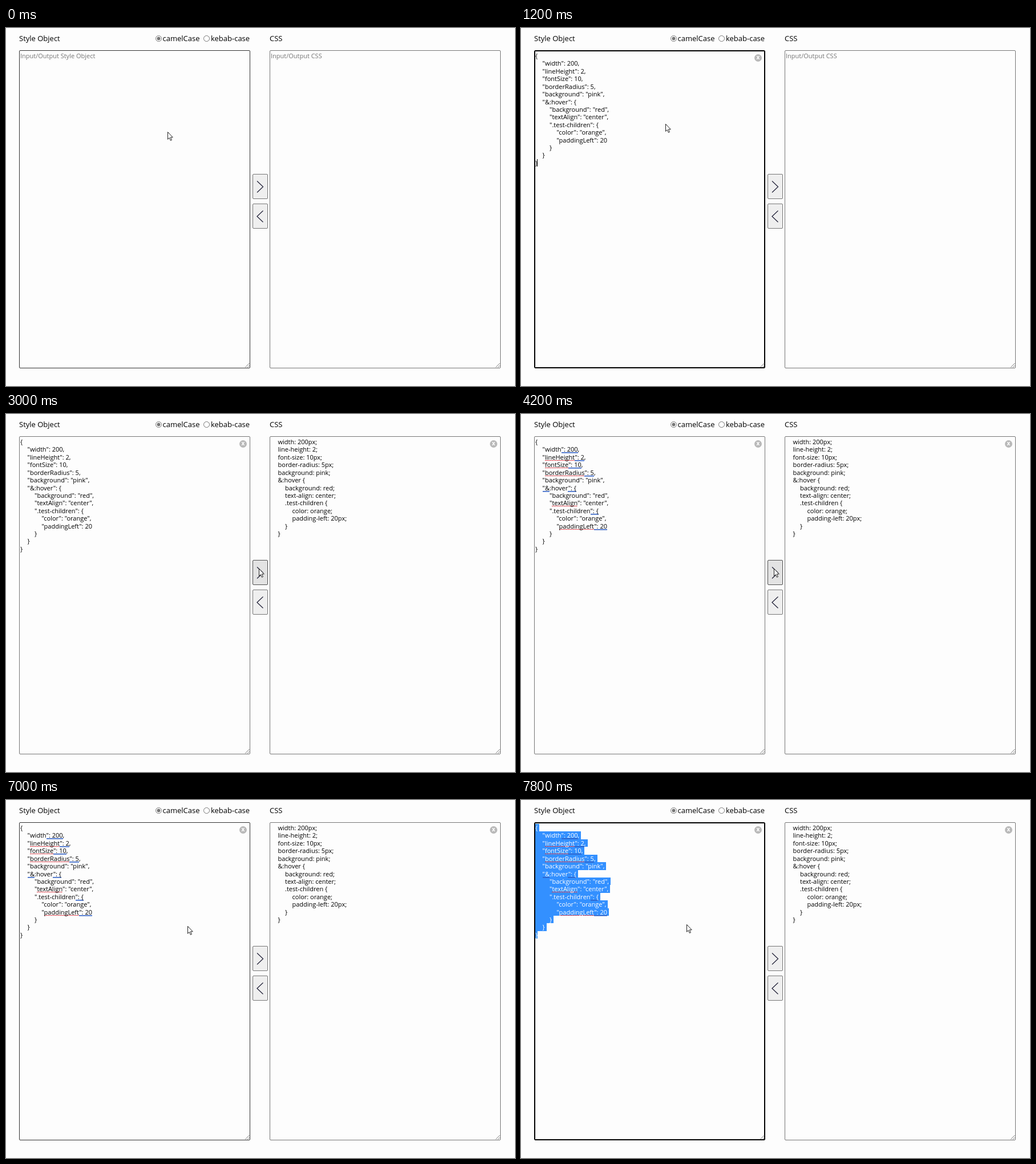
Write an HTML page that moves like this. It is 892 by 628 pixels and loops after 8 s.

```html
<!DOCTYPE html>
<html lang="en">
<head>
<meta charset="utf-8">
<title>Style Object and CSS converter</title>
<style>
  html, body { margin: 0; width: 100%; height: 100%; overflow: hidden; background: #fdfdfd; }
  body { position: relative; color: #000; font: 11px/13.43px "Open Sans", "Noto Sans", sans-serif; }
  body > *, .box > * { position: absolute; box-sizing: border-box; }

  /* every state change is a hard step on one shared 8 s clock */
  .box, .btn, .hint, .clear, .code, .code div, .code i, .code u, .caret, .radio, .cursor {
    animation: 8s step-end infinite;
  }

  .title { top: 9px; font-size: 13px; line-height: 18px; white-space: pre; }
  .radio { top: 13px; width: 11px; height: 11px; border: 1px solid #767676; border-radius: 50%; background: #fff; }
  .radio.on { background: radial-gradient(circle, #767676 2.7px, #fff 3.3px); }
  .radio.kebab { animation-name: kebab; }

  .box { top: 39px; width: 405px; height: 558px; border: 1px solid #767676; border-radius: 2px; }
  .left { left: 23px; animation-name: left-box; }
  .right { left: 462px; animation-name: right-box; }
  .hint, .code { left: 1px; top: 2px; white-space: pre; }
  .hint { color: #757575; }
  .code { tab-size: 12.5px; }
  .code div { width: max-content; height: 13.43px; padding-right: 3px; }
  .code div:last-child { padding-right: 0; }
  .clear { left: 385px; top: 6px; width: 13px; height: 13px; border-radius: 50%; background: #b9b9b9;
           color: #fff; font-weight: 700; font-size: 10px; line-height: 11px; text-align: center; }
  .grip { right: 0; bottom: 0; width: 8px; height: 8px; stroke: #777; fill: none; }
  .caret { width: 1px; height: 13px; background: #000; }
  .caret.start { left: 1px; top: 3px; animation-name: caret-start; }
  .caret.end { left: 4px; top: 190px; animation-name: caret-end; }

  .left .hint { animation-name: before-paste; }
  .left .code, .left .clear { animation-name: after-paste; }
  .right .hint { animation-name: before-convert; }
  .right .code, .right .clear { animation-name: after-convert; }
  .left .code div { animation-name: select; }

  /* i: spelling mark, u: grammar mark */
  .code i, .code u { font-style: normal; text-decoration: none; background: 0 13px / 0 0 no-repeat; }
  .code i { background-image: repeating-linear-gradient(90deg, #d8323c 0 2px, #eb9a9f 2px 3px); animation-name: spell; }
  .code u { background-image: linear-gradient(#2f5fc4, #2f5fc4); animation-name: grammar; }

  .btn { left: 432px; width: 27px; height: 44px; border: 1px solid #767676; border-radius: 2px; background: #efefef; }
  .btn svg { position: absolute; left: 6px; top: 10px; width: 14px; height: 23px; fill: none; stroke: #26263c; stroke-width: 1.3; }
  .to-css { top: 256px; animation-name: press; }
  .to-obj { top: 308px; }

  .cursor { left: 0; top: 0; width: 12px; height: 18px; overflow: visible; animation-name: move;
            fill: #fff; stroke: #222; stroke-width: 1; stroke-linejoin: round; }

  @keyframes move {
    0% { transform: translate(283px, 182px); }
    2.5% { transform: translate(268px, 176px); }
    5% { transform: translate(253px, 168px); }
    20% { transform: translate(254px, 160px); }
    22.5% { transform: translate(290px, 190px); }
    25% { transform: translate(355px, 235px); }
    27.5% { transform: translate(418px, 280px); }
    30% { transform: translate(440px, 291px); }
    32.5% { transform: translate(443px, 271px); }
    62.5% { transform: translate(456px, 258px); }
    65% { transform: translate(452px, 190px); }
    67.5% { transform: translate(441px, 95px); }
    70% { transform: translate(425px, 32px); }
    72.5% { transform: translate(379px, 20px); }
    77.5% { transform: translate(445px, 50px); }
    80% { transform: translate(505px, 120px); }
    82.5% { transform: translate(480px, 185px); }
    85% { transform: translate(395px, 215px); }
    87.5% { transform: translate(318px, 221px); }
    90% { transform: translate(306px, 228px); }
    92.5% { transform: translate(290px, 215px); }
    97.5%, 100% { transform: translate(290px, 218px); }
  }
  @keyframes left-box {
    0%, 85% { border-color: #333; box-shadow: none; }
    5%, 90%, 100% { border-color: #000; box-shadow: inset 0 0 0 1px #000; }
    35% { border-color: #767676; box-shadow: none; }
  }
  @keyframes right-box { 0%, 85%, 100% { border-color: #767676; } 80% { border-color: #333; } }
  @keyframes press {
    0%, 65%, 100% { background-color: #efefef; border-color: #767676; }
    30% { background-color: #e3e3e3; border-color: #4f4f4f; }
  }
  @keyframes kebab { 0%, 77.5%, 100% { border-color: #767676; } 72.5% { border-color: #4f4f4f; } }
  @keyframes before-paste { 0% { opacity: 1; } 12.5%, 100% { opacity: 0; } }
  @keyframes after-paste { 0% { opacity: 0; } 12.5%, 100% { opacity: 1; } }
  @keyframes before-convert { 0% { opacity: 1; } 37.5%, 100% { opacity: 0; } }
  @keyframes after-convert { 0% { opacity: 0; } 37.5%, 100% { opacity: 1; } }
  @keyframes caret-start { 0%, 12.5%, 100% { opacity: 0; } 5% { opacity: 1; } }
  @keyframes caret-end {
    0%, 20%, 32.5%, 97.5%, 100% { opacity: 0; }
    15%, 27.5%, 90% { opacity: 1; }
  }
  @keyframes spell { 0% { background-size: 0 0; } 52.5%, 100% { background-size: 100% 1.4px; } }
  @keyframes grammar { 0% { background-size: 0 0; } 52.5%, 100% { background-size: 100% 1.6px; } }
  @keyframes select {
    0% { background-color: transparent; color: #000; }
    97.5%, 100% { background-color: #3390ff; color: #fff; }
  }
</style>
</head>
<body>
  <div class="title" style="left:23px">Style Object</div>
  <div class="radio on" style="left:262px"></div>
  <div class="title" style="left:274.5px">camelCase</div>
  <div class="radio kebab" style="left:346px"></div>
  <div class="title" style="left:359px">kebab-case</div>
  <div class="title" style="left:462px">CSS</div>

  <div class="box left">
    <div class="hint">Input/Output Style Object</div>
    <div class="code"><div>{</div><div>&#9;"width<u>": 200</u>,</div><div>&#9;"<i>lineHeight</i><u>": 2</u>,</div><div>&#9;"<i>fontSize</i><u>": 10</u>,</div><div>&#9;"<i>borderRadius</i><u>": 5</u>,</div><div>&#9;"background": "pink",</div><div>&#9;<u>"&amp;</u>:hover<u>": {</u></div><div>&#9;&#9;"background": "red",</div><div>&#9;&#9;"<i>textAlign</i>": "center",</div><div>&#9;&#9;".test-children<u>": {</u></div><div>&#9;&#9;&#9;"color": "orange",</div><div>&#9;&#9;&#9;"<i>paddingLeft</i><u>": 20</u></div><div>&#9;&#9;}</div><div>&#9;}</div><div>}</div></div>
    <div class="caret start"></div>
    <div class="caret end"></div>
    <div class="clear">x</div>
    <svg class="grip"><path d="M0 7.5 7.5 0M4 7.5 7.5 4"/></svg>
  </div>

  <div class="box right">
    <div class="hint">Input/Output CSS</div>
    <div class="code"><div>&#9;width: 200px;</div><div>&#9;line-height: 2;</div><div>&#9;font-size: 10px;</div><div>&#9;border-radius: 5px;</div><div>&#9;background: pink;</div><div>&#9;&amp;:hover {</div><div>&#9;&#9;background: red;</div><div>&#9;&#9;text-align: center;</div><div>&#9;&#9;.test-children {</div><div>&#9;&#9;&#9;color: orange;</div><div>&#9;&#9;&#9;padding-left: 20px;</div><div>&#9;&#9;}</div><div>&#9;}</div></div>
    <div class="clear">x</div>
    <svg class="grip"><path d="M0 7.5 7.5 0M4 7.5 7.5 4"/></svg>
  </div>

  <div class="btn to-css"><svg><path d="M1 1.5 11.5 11.5 1 21.5"/></svg></div>
  <div class="btn to-obj"><svg><path d="M11.5 1.5 1 11.5 11.5 21.5"/></svg></div>

  <svg class="cursor"><path d="M.5 .5V13.3L3.3 10.6 5.4 15.4 7.4 14.5 5.4 9.8H9.3Z"/></svg>
</body>
</html>
```
